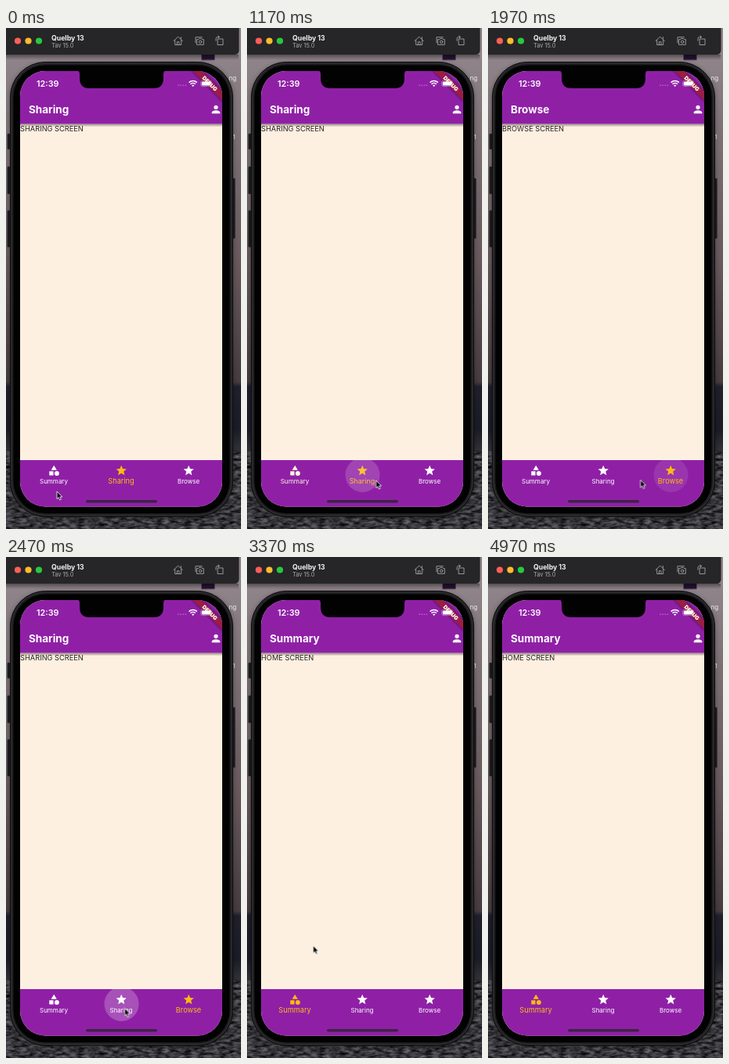
An HTML page for the animation above (5.01 s loop, 300 by 640 pixels).

```html
<!DOCTYPE html>
<html lang="en">
<head>
<meta charset="utf-8">
<title>Tab navigation demo</title>
<style>
  @property --on { syntax: "<number>"; inherits: true; initial-value: 0; }

  html, body { margin: 0; width: 100%; height: 100%; overflow: hidden; background: #262527; }
  svg { display: block; width: 300px; height: 640px; font-family: Inter, "Open Sans", sans-serif; }

  .page, .tab, .ripple, .cursor { animation: 5010ms linear infinite; }

  /* pages swap at once on each tap */
  .page { animation-timing-function: step-end; }
  .page .title { font-size: 13.5px; font-weight: 700; fill: #fff; }
  .page .body { font-size: 9.25px; fill: #242220; }
  .page.summary { animation-name: summary-page; }
  .page.sharing { animation-name: sharing-page; }
  .page.browse { animation-name: browse-page; }
  @keyframes summary-page {
    0%, 20.36% { opacity: 0; }
    8.58%, 58.28%, 100% { opacity: 1; }
  }
  @keyframes sharing-page {
    0%, 20.36%, 49.1% { opacity: 1; }
    8.58%, 33.93%, 58.28%, 100% { opacity: 0; }
  }
  @keyframes browse-page {
    0%, 49.1%, 100% { opacity: 0; }
    33.93% { opacity: 1; }
  }

  /* tabs tint and grow over 200 ms */
  .tab { fill: color-mix(in srgb, #fcba12 calc(var(--on) * 100%), #fff); animation-timing-function: ease-in-out; }
  .tab text {
    font-size: 8px; text-anchor: middle;
    transform-origin: 0 585px;
    transform: scale(calc(1 + .15 * var(--on)));
  }
  .tab.summary { animation-name: summary-tab; }
  .tab.sharing { animation-name: sharing-tab; }
  .tab.browse { animation-name: browse-tab; }
  @keyframes summary-tab {
    0%, 8.58%, 24.4%, 58.28% { --on: 0; }
    12.6%, 20.36%, 62.3%, 100% { --on: 1; }
  }
  @keyframes sharing-tab {
    0%, 8.58%, 24.4%, 33.93%, 53.1%, 58.28% { --on: 1; }
    12.6%, 20.36%, 37.9%, 49.1%, 62.3%, 100% { --on: 0; }
  }
  @keyframes browse-tab {
    0%, 33.93%, 53.1%, 100% { --on: 0; }
    37.9%, 49.1% { --on: 1; }
  }

  .ripple {
    fill: #fff; opacity: 0;
    transform-box: fill-box; transform-origin: center;
    animation-name: ripple;
    animation-delay: calc(var(--start) * 1ms - 5010ms);
  }
  @keyframes ripple {
    0% { opacity: 0; transform: scale(.25); }
    2.8%, 4% { opacity: .22; transform: scale(1); }
    11.6%, 100% { opacity: 0; transform: scale(1); }
  }

  .cursor { animation-name: cursor; animation-timing-function: ease-in-out; }
  @keyframes cursor {
    0% { transform: translate(65px, 592px); }
    4.6%, 9.4% { transform: translate(61px, 577px); }
    9.4% { animation-timing-function: ease-in; }
    15.37% { transform: translate(120px, 582.5px); animation-timing-function: ease-out; }
    19%, 21.2% { transform: translate(146px, 578px); }
    27.9%, 34.3% { transform: translate(231px, 578px); }
    44.9%, 49.9% { transform: translate(151.5px, 576.5px); }
    55.9%, 59.1% { transform: translate(62px, 577px); }
    67.3%, 71.9% { transform: translate(84.5px, 496.5px); }
    79.8%, 100% { transform: translate(-14px, 440px); }
  }
</style>
</head>
<body>
<svg viewBox="0 0 300 640">
  <defs>
    <linearGradient id="dusk" gradientUnits="userSpaceOnUse" x1="0" y1="34" x2="0" y2="640">
      <stop offset="0" stop-color="#90858a"/>
      <stop offset=".16" stop-color="#7e7277"/>
      <stop offset=".44" stop-color="#67595c"/>
      <stop offset=".69" stop-color="#473c40"/>
      <stop offset=".7" stop-color="#1f202c"/>
      <stop offset=".79" stop-color="#1b1c28"/>
      <stop offset=".83" stop-color="#303036"/>
      <stop offset="1" stop-color="#39383c"/>
    </linearGradient>
    <linearGradient id="shade" x1="0" y1="0" x2="0" y2="1">
      <stop offset="0" stop-opacity=".42"/>
      <stop offset="1" stop-opacity="0"/>
    </linearGradient>
    <filter id="waves" x="0" y="0" width="1" height="1" color-interpolation-filters="sRGB">
      <feTurbulence type="fractalNoise" baseFrequency=".11 .3" numOctaves="3" seed="4"/>
      <feColorMatrix values=".7 0 0 0 -.13  .7 0 0 0 -.135  .7 0 0 0 -.12  0 0 0 0 1"/>
    </filter>
    <filter id="blur" x="-.2" y="-.2" width="1.4" height="1.4"><feGaussianBlur stdDeviation="3"/></filter>
    <clipPath id="screen"><rect x="18" y="55" width="258" height="556.5" rx="32"/></clipPath>
    <clipPath id="nav"><rect x="18" y="552" width="258" height="60"/></clipPath>
    <path id="star" d="M12 17.27L18.18 21l-1.64-7.03L22 9.24l-7.19-.61L12 2 9.19 8.63 2 9.24l5.46 4.73L5.82 21z"/>
    <path id="shapes" d="M12 2l-5.5 9h11zM3 13.5h8v8H3zM13 17.5a4.5 4.5 0 1 0 9 0 4.5 4.5 0 1 0-9 0z"/>
    <path id="person" d="M12 12a4 4 0 1 0 0-8 4 4 0 0 0 0 8zm0 2c-2.67 0-8 1.34-8 4v2h16v-2c0-2.66-5.33-4-8-4z"/>
  </defs>

  <!-- desktop -->
  <rect width="300" height="640" fill="url(#dusk)"/>
  <rect y="540" width="300" height="100" filter="url(#waves)" opacity=".85"/>
  <rect x="249.5" y="28" width="17" height="13" rx="1" fill="#251330" stroke="#6d5077"/>
  <g font-size="8" fill="#eee">
    <text x="284.5" y="67">ng</text>
    <text x="289.5" y="142">1</text>
  </g>
  <rect x="5.5" y="45" width="284" height="580" rx="45" filter="url(#blur)" opacity=".4"/>

  <!-- window bar -->
  <rect y="34" width="297" height="7" fill="url(#shade)"/>
  <rect x="-8" y="-8" width="305.5" height="42" rx="5.5" fill="#262527"/>
  <circle cx="15" cy="16.5" r="4.1" fill="#fe5f57"/>
  <circle cx="28.5" cy="16.5" r="4.1" fill="#febc2e"/>
  <circle cx="42" cy="16.5" r="4.1" fill="#28c840"/>
  <text x="58" y="15.5" font-size="8.7" font-weight="700" fill="#f2f2f2">Quelby 13</text>
  <text x="58" y="24.7" font-size="7.4" fill="#aaa9ab">Tav 15.0</text>
  <g fill="none" stroke="#a3a2a4" stroke-width=".9" stroke-linejoin="round" stroke-linecap="round">
    <path d="M214 16.5l5.7-5.3 5.7 5.3M215.7 15.5v6h8v-6M218.4 21.3v-3.6h2.6v3.6M223.4 13.8v-2.2"/>
    <path d="M244 14.6h1.8l.8-1.2h3l.8 1.2h1.9v6.7H244zM242 18.9v-7.2h8.3"/>
    <circle cx="248.1" cy="17.7" r="1.7"/>
    <path d="M270.5 14h6.5v7.5h-6.5zM268 16.2v-2.4q0-2.3 2.3-2.3h2M270.8 9.9l1.7 1.6-1.7 1.6"/>
  </g>

  <!-- phone body -->
  <g fill="#19191b" stroke="#3b3a3d" stroke-width=".5">
    <rect x="1.8" y="135" width="5" height="20" rx="1"/>
    <rect x="1.8" y="177" width="5" height="35" rx="1"/>
    <rect x="1.8" y="233" width="5" height="47" rx="1"/>
    <rect x="287" y="192" width="5.5" height="77" rx="1"/>
  </g>
  <rect x="5.5" y="43.5" width="284" height="580.5" rx="45" fill="#1d1d1f" stroke="#0d0d0e"/>
  <rect x="7" y="45" width="281" height="577.5" rx="43.5" fill="none" stroke="#38373a" stroke-width=".9"/>
  <rect x="9.5" y="47.5" width="276" height="572.5" rx="41" fill="#020202"/>

  <!-- app -->
  <g clip-path="url(#screen)">
    <rect x="18" y="55" width="258" height="557" fill="#fef0e1"/>
    <rect x="18" y="122.5" width="258" height="4" fill="url(#shade)"/>
    <rect x="18" y="55" width="258" height="67.5" fill="#8f20a6"/>

    <g class="page summary"><text class="title" x="29" y="109">Summary</text><text class="body" x="18" y="131.6">HOME SCREEN</text></g>
    <g class="page sharing"><text class="title" x="29" y="109">Sharing</text><text class="body" x="18" y="131.6">SHARING SCREEN</text></g>
    <g class="page browse"><text class="title" x="29" y="109">Browse</text><text class="body" x="18" y="131.6">BROWSE SCREEN</text></g>
    <use href="#person" fill="#fff" transform="translate(260.1 96) scale(.66)"/>

    <rect x="18" y="552" width="258" height="60" fill="#8f20a6"/>
    <g clip-path="url(#nav)">
      <circle class="ripple" cx="61" cy="573" r="22" style="--start:290"/>
      <circle class="ripple" cx="147.5" cy="571" r="22" style="--start:880"/>
      <circle class="ripple" cx="233.5" cy="571" r="22" style="--start:1560"/>
      <circle class="ripple" cx="147.5" cy="571" r="22" style="--start:2320"/>
      <circle class="ripple" cx="61.5" cy="571" r="22" style="--start:2780"/>
    </g>
    <g transform="translate(61)"><g class="tab summary">
      <use href="#shapes" transform="translate(-7.7 557.4) scale(.66)"/>
      <text y="582">Summary</text>
    </g></g>
    <g transform="translate(147)"><g class="tab sharing">
      <use href="#star" transform="translate(-7.7 557.4) scale(.66)"/>
      <text y="582">Sharing</text>
    </g></g>
    <g transform="translate(233)"><g class="tab browse">
      <use href="#star" transform="translate(-7.7 557.4) scale(.66)"/>
      <text y="582">Browse</text>
    </g></g>
    <rect x="102" y="603" width="91" height="3.6" rx="1.8" fill="#3d2444"/>

    <g transform="translate(276 55) rotate(45)">
      <rect x="-30" y="18.5" width="60" height="8" filter="url(#blur)" opacity=".5"/>
      <rect x="-27" y="18.5" width="54" height="8" fill="#9c1c45"/>
      <text y="24.9" font-size="6.9" font-weight="900" text-anchor="middle" fill="#fff">DEBUG</text>
    </g>

    <!-- status bar -->
    <text x="39" y="75" font-size="10.8" font-weight="600" fill="#fff">12:39</text>
    <path d="M219.3 73.3h11" stroke="#fff" stroke-opacity=".3" stroke-width="1.6" stroke-dasharray="1.6 1.5"/>
    <g fill="none" stroke="#fff" stroke-width="1.5">
      <path d="M233.6 69.6a7.4 7.4 0 0 1 10.2 0M235.5 71.7a4.7 4.7 0 0 1 6.4 0"/>
    </g>
    <path d="M238.7 75l-1.7-1.8a2.5 2.5 0 0 1 3.4 0z" fill="#fff"/>
    <rect x="248.6" y="67.2" width="14" height="7.4" rx="2.2" fill="none" stroke="#fff" stroke-opacity=".45" stroke-width=".7"/>
    <rect x="249.8" y="68.4" width="11.6" height="5" rx="1.2" fill="#fff"/>
  </g>
  <path d="M90 54h115q-4 .5-4 5v5q0 13-12.5 13h-82Q94 77 94 64v-5q0-4.5-4-5z" fill="#020202"/>

  <g class="cursor">
    <path d="M0 0v9.6l2.2-2 1.5 3.4 1.7-.7-1.5-3.4h3z" fill="#050505" stroke="#fff" stroke-width=".8" stroke-linejoin="round"/>
  </g>
</svg>
</body>
</html>
```
